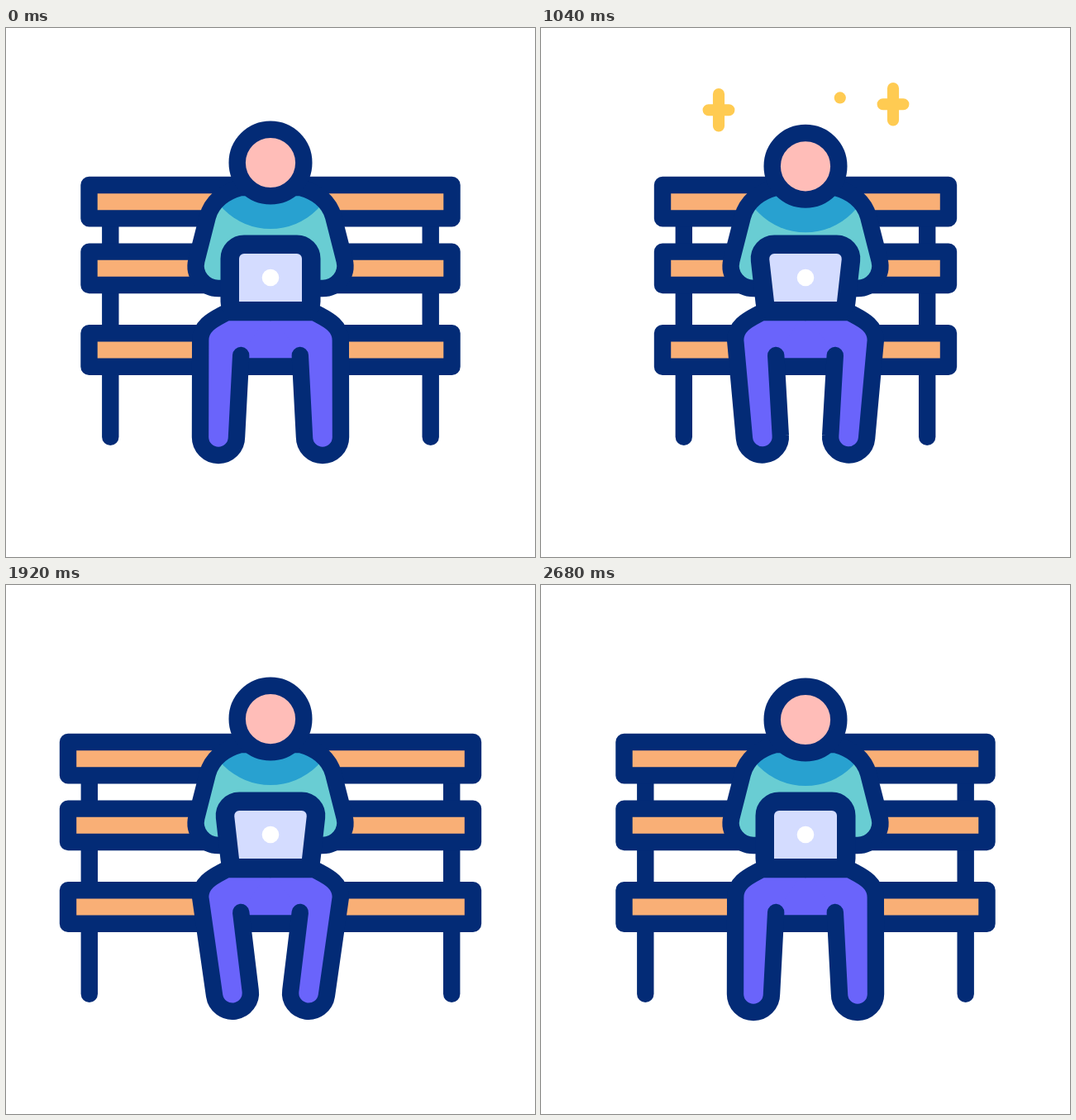
Recreate the animation shown at these times as an HTML page with a canvas. Size 640 by 640 pixels, loop 3000 ms.

```html
<!DOCTYPE html>
<html lang="en">
<head>
<meta charset="utf-8">
<title>Working on a bench</title>
<style>
html, body { margin: 0; width: 100%; height: 100%; overflow: hidden; background: #fff; }
canvas { display: block; width: 100%; height: 100%; }
</style>
</head>
<body>
<canvas width="640" height="640"></canvas>
<script>
const ctx = document.querySelector('canvas').getContext('2d');
const LOOP = 3000, LINE = 20.4;
const NAVY = '#032b76', ORANGE = '#f9af76', SKIN = '#ffbdb8', TEAL = '#69cdd3', BLUE = '#28a1d0',
  PURPLE = '#6a64fb', SCREEN = '#d4dcff', YELLOW = '#ffcb52';

// Keyframes are [time, value] pairs joined by a sine ease.
const tracks = {
  bench: [[200, 229.7], [690, 184.5], [1370, 182], [1850, 256], [2480, 229.7]],
  leg: [[200, 0], [790, 1], [1370, 0], [2020, 1], [2670, 0]],
  head: [[280, 163], [580, 159.8], [1050, 167.3], [1320, 167.3], [1660, 160.4], [2100, 163]],
  laptop: [[200, 38], [730, 44.5], [1960, 44.5], [2490, 38]],
  spark: [[780, 0], [1200, 1], [1370, 1], [1650, 0]]
};

function valueAt(keys, t) {
  const next = keys.findIndex(key => key[0] > t);
  if (next === 0) return keys[0][1];
  if (next < 0) return keys[keys.length - 1][1];
  const [t0, a] = keys[next - 1], [t1, b] = keys[next];
  return a + (b - a) * (1 - Math.cos(Math.PI * (t - t0) / (t1 - t0))) / 2;
}

function paint(path, fill, stroke, width = LINE) {
  if (fill) { ctx.fillStyle = fill; ctx.fill(path); }
  if (stroke) { ctx.strokeStyle = stroke; ctx.lineWidth = width; ctx.stroke(path); }
}

function circle(x, y, r) {
  const path = new Path2D();
  path.arc(x, y, r, 0, 2 * Math.PI);
  return path;
}

function bothSides(draw) {
  draw();
  ctx.save();
  ctx.translate(640, 0);
  ctx.scale(-1, 1);
  draw();
  ctx.restore();
}

function drawBench(half) {
  const left = 320 - half;
  bothSides(() => paint(new Path2D(`M${left + 36} 200V494.8`), null, NAVY));
  for (const y of [210.2, 290.8, 389.5]) {
    const plank = new Path2D();
    plank.rect(left + 10.2, y - 20.2, 2 * half - 20.4, 40.4);
    paint(plank, ORANGE, NAVY);
  }
}

const body = new Path2D('M284 193C262 199 249 211 244 228L230.5 281C226 299 240 315 257 315' +
  'H383C400 315 414 299 409.5 281L396 228C391 211 378 199 356 193Z');

function drawBody(headY) {
  paint(body, TEAL);
  ctx.save();
  ctx.clip(body);
  paint(circle(320, headY, 80), BLUE);
  ctx.restore();
  paint(body, null, NAVY);
  paint(circle(320, headY, 40.3), SKIN, NAVY);
}

function drawLegs(swing) {
  const angle = swing * 0.151;
  const dx = Math.cos(angle) * 22, dy = Math.sin(angle) * 22;
  const x = 257 + Math.sin(angle) * 119, y = 376 + Math.cos(angle) * 119;
  const leg = new Path2D(`M320 344H267C255 351 235 358 235.2 378L${x - dx} ${y + dy}` +
    `A22 22 0 0 0 ${x + dx} ${y - dy}L284.2 396`);
  paint(new Path2D('M284 344H356V409H284Z'), PURPLE);
  paint(new Path2D('M284 409.5H356'), null, NAVY);
  bothSides(() => paint(leg, PURPLE, NAVY));
}

function drawLaptop(top) {
  const screen = new Path2D();
  screen.moveTo(282, 331);
  screen.arcTo(320 - top, 273, 320, 273, 6);
  screen.arcTo(320 + top, 273, 358, 331, 6);
  screen.lineTo(358, 331);
  screen.closePath();
  paint(screen, null, NAVY, 45);
  paint(screen, SCREEN);
  paint(circle(320, 302, 10.3), '#fff');
}

function drawSparks(scale) {
  if (scale < 0.01) return;
  const at = (x, y, draw) => {
    ctx.save();
    ctx.translate(x, y);
    ctx.scale(scale, scale);
    draw();
    ctx.restore();
  };
  const plus = () => paint(new Path2D('M0 -28V28M-18 0H18'), null, YELLOW, 20.6);
  at(215, 99.3, plus);
  at(426, 92.2, plus);
  at(361.8, 84.4, () => paint(circle(0, 0, 10.3), YELLOW));
}

function render(now) {
  const t = now % LOOP;
  const pose = {};
  for (const name in tracks) pose[name] = valueAt(tracks[name], t);
  ctx.fillStyle = '#fff';
  ctx.fillRect(0, 0, 640, 640);
  ctx.lineCap = ctx.lineJoin = 'round';
  drawSparks(pose.spark);
  drawBench(pose.bench);
  drawBody(pose.head);
  drawLegs(pose.leg);
  drawLaptop(pose.laptop);
}

const start = performance.now();
function tick() {
  render(performance.now() - start);
  requestAnimationFrame(tick);
}
tick();
</script>
</body>
</html>
```
